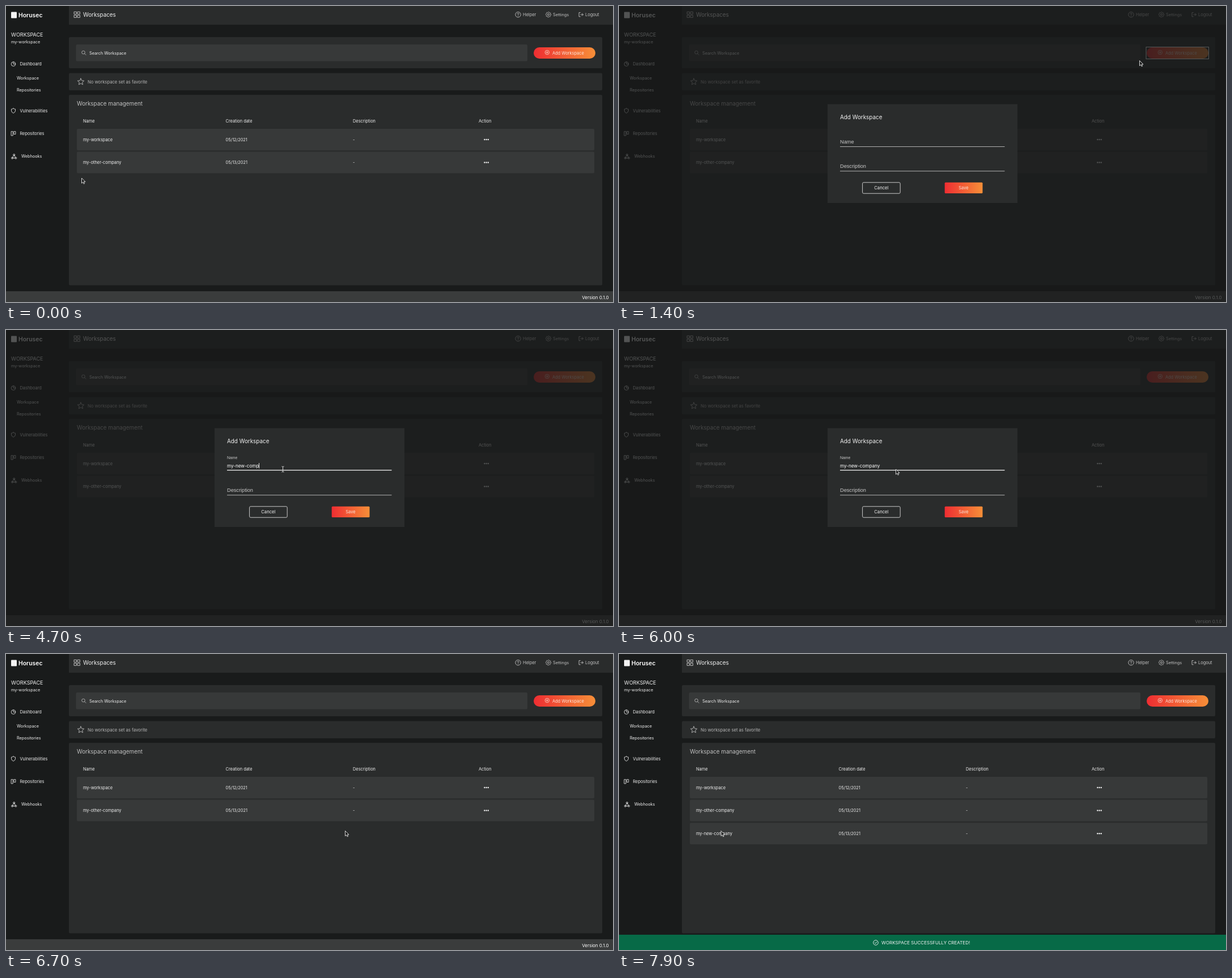
Animation, 1071 px wide and 523 px high, one loop 8 s. Source, as an HTML page:

```html
<!DOCTYPE html>
<html lang="en">
<head>
<meta charset="utf-8">
<title>Add workspace</title>
<style>
html, body { margin: 0; width: 100%; height: 100%; overflow: hidden; background: #191b1b; }
svg { display: block; width: 100vw; height: 100vh; font-family: Inter, "Open Sans", sans-serif; }
text { white-space: pre; }
.mui { font-family: "Liberation Sans", Arial, sans-serif; }
</style>
</head>
<body>
<svg id="stage" viewBox="0 0 1071 523" xmlns="http://www.w3.org/2000/svg">
  <defs>
    <linearGradient id="fire"><stop offset="0" stop-color="#ee2d32"/><stop offset="1" stop-color="#f78f38"/></linearGradient>
  </defs>
  <g id="page"></g>
  <g id="row3"></g>
  <g id="add"></g>
  <rect id="ring" fill="none" stroke="#fff"/>
  <rect id="shade" width="1071" height="523" fill="#181a1a" opacity=".73"/>
  <g id="modal"></g>
  <g id="toast"></g>
  <g id="arrow"><path d="M.5 .5V9.6L2.7 7.7L4.2 10.8L5.6 10.1L4.2 7.1H7Z" fill="#1b1c1c" stroke="#e8e8e8" stroke-width=".9" stroke-linejoin="round"/></g>
  <g id="beam"><path d="M-2 -5Q0 -5 0 -3.6Q0 -5 2 -5M0 -3.6V3.6M-2 5Q0 5 0 3.6Q0 5 2 5M-1 1.5H1" fill="none" stroke="#e8e8e8" stroke-width=".9"/></g>
</svg>
<script>
const NS = 'http://www.w3.org/2000/svg';
const $ = id => document.getElementById(id);

function el(parent, tag, attrs) {
  const node = document.createElementNS(NS, tag);
  set(node, attrs);
  return parent.appendChild(node);
}
function set(node, attrs) {
  for (const k in attrs) node.setAttribute(k, attrs[k]);
}
const box = (p, x, y, w, h, fill, rx = 0) =>
  el(p, 'rect', { x, y, width: w, height: h, fill, rx });
const line = (p, d, stroke = '#ddd', w = .9) =>
  el(p, 'path', { d, fill: 'none', stroke, 'stroke-width': w, 'stroke-linejoin': 'round', 'stroke-linecap': 'round' });
const ring = (p, cx, cy, r, stroke = '#ddd', w = .9) =>
  el(p, 'circle', { cx, cy, r, fill: 'none', stroke, 'stroke-width': w });
function text(p, str, x, y, size = 7.4, fill = '#eee', more = {}) {
  const node = el(p, 'text', { x, y, 'font-size': size, fill, ...more });
  node.textContent = str;
  return node;
}

function drawSidebar(p) {
  box(p, 9, 10.5, 10, 11, '#f2f2f2', 1);
  text(p, 'Horusec', 22, 20.2, 10.4, '#fff', { 'font-weight': 600 });
  text(p, 'WORKSPACE', 9, 53.8, 9.05);
  text(p, 'my-workspace', 9, 65.8, 7.25);
  const items = [['Dashboard', 24.5, 105, 7.45], ['Workspace', 19, 130.1, 7.3], ['Repositories', 19, 151.2, 7.3],
    ['Vulnerabilities', 24.5, 187.6, 7.35], ['Repositories', 24.5, 227.9, 7.35], ['Webhooks', 27, 268.2, 7.3]];
  items.forEach(i => text(p, ...i));
  ring(p, 13, 102.5, 3.8);
  line(p, 'M13 98.7V102.5H16.8');
  line(p, 'M13 181Q14.5 182.3 16.5 182.2V185Q16.4 188 13 189.3Q9.6 188 9.5 185V182.2Q11.5 182.3 13 181Z');
  line(p, 'M9.5 221.7H12.2V229H9.5ZM14.2 221.7H16.9V226.5H14.2Z');
  line(p, 'M14 263.4L11.2 268.5M14.4 263.4L17 268.5M11.5 268.7H16.5');
  [[14.2, 263], [11, 268.6], [17.3, 268.6]].forEach(c => ring(p, ...c, 1.5));
}

function drawHeader(p) {
  box(p, 111, 0, 960, 33, '#2a2c2c');
  for (const x of [120.4, 126.4]) for (const y of [10.3, 16.3])
    line(p, `M${x} ${y}h4v4h-4z`, '#ccc');
  text(p, 'Workspaces', 136, 18.8, 9.85, '#f2f2f2');
  const grey = '#c2c2c2';
  text(p, 'Helper', 912, 17.9, 7.45, grey);
  text(p, 'Settings', 965, 17.9, 7.3, grey);
  text(p, 'Logout', 1022, 17.9, 7.45, grey);
  ring(p, 903.5, 15.2, 4.7, grey);
  line(p, 'M902.1 14Q902.2 12.6 903.5 12.6Q905 12.7 905 14Q904.8 14.8 903.6 15.5V16.1M903.6 17.7V17.8', grey);
  ring(p, 957, 15.2, 1.6, grey);
  let gear = '';
  for (let i = 0; i < 32; i++) {
    const r = i % 4 < 2 ? 4.7 : 3.7, a = i * Math.PI / 16;
    gear += (i ? 'L' : 'M') + (957 + r * Math.cos(a)).toFixed(2) + ' ' + (15.2 + r * Math.sin(a)).toFixed(2);
  }
  line(p, gear + 'Z', grey, .8);
  line(p, 'M1013.3 11.6H1011V18.8H1013.3M1014 15.2H1018.3M1016.4 13.2L1018.4 15.2L1016.4 17.2', grey);
}

function drawRow(p, y, name, date) {
  box(p, 125, y, 913, 38, '#373939', 2);
  text(p, name, 136, y + 21.6, 7.4);
  text(p, date, 387.5, y + 21.6, 7.35);
  text(p, '-', 612, y + 21.6);
  for (const x of [844.4, 847.6, 850.8]) el(p, 'circle', { cx: x, cy: y + 19, r: 1.2, fill: '#eee' });
}

function drawPage(p) {
  box(p, 0, 0, 1071, 523, '#191b1b');
  drawSidebar(p);
  drawHeader(p);
  box(p, 111, 55, 941, 55, '#2a2c2c', 2);
  box(p, 123.5, 68, 796.5, 29.5, '#373939', 2);
  ring(p, 136.5, 82, 2.8, '#b0b0b0');
  line(p, 'M138.6 84.1L141 86.5', '#b0b0b0');
  text(p, 'Search Workspace', 147, 85.5, 7.3);
  box(p, 111, 118.5, 941, 30.5, '#2a2c2c', 2);
  let star = '';
  for (let i = 0; i < 10; i++) {
    const r = i % 2 ? 2.8 : 6, a = i * Math.PI / 5;
    star += (i ? 'L' : 'M') + (132 + r * Math.sin(a)).toFixed(2) + ' ' + (134 - r * Math.cos(a)).toFixed(2);
  }
  line(p, star + 'Z', '#bbb');
  text(p, 'No workspace set as favorite', 144, 136.7, 7.65, '#b5b5b5');
  box(p, 111, 157, 941, 336.5, '#2a2c2c', 2);
  text(p, 'Workspace management', 125, 176, 9.85, '#c2c2c2');
  [['Name', 136], ['Creation date', 387.5], ['Description', 612], ['Action', 834]]
    .forEach(([s, x]) => text(p, s, x, 206, 7.4));
  drawRow(p, 217, 'my-workspace', '05/12/2021');
  drawRow(p, 257.5, 'my-other-company', '05/13/2021');
  box(p, 0, 504, 1071, 19, '#3a3c3c');
  text(p, 'Version 0.1.0', 1063.5, 518, 7.95, '#fff', { 'text-anchor': 'end' });
}

function drawAdd(p) {
  box(p, 931, 73, 109, 20, 'url(#fire)', 10);
  ring(p, 954.8, 82, 3.7, '#f8dcd2', .8);
  line(p, 'M953.2 82H956.4M954.8 80.4V83.6', '#f8dcd2', .8);
  text(p, 'Add Workspace', 964, 85.6, 7.4, '#fbe6dc');
}

drawPage($('page'));
drawRow($('row3'), 298.3, 'my-new-company', '05/13/2021');
drawAdd($('add'));

const modal = $('modal');
box(modal, 368, 173.5, 335, 174.5, '#2a2c2c');
text(modal, 'Add Workspace', 390, 199.8, 9.88, '#f2f2f2');
const label = text(modal, 'Name', 0, 0, 9.2, '#c8c8c8', { class: 'mui' });
text(modal, 'Description', 390, 286.2, 9.2, '#c8c8c8', { class: 'mui' });
const under = box(modal, 390, 248, 290.5, 1, '#b4b4b4');
box(modal, 390, 291.3, 290.5, .9, '#c0c0c0');
const input = text(modal, '', 390, 242.7, 8.15, '#fff');
const caret = box(modal, 390, 235, 1, 9.5, '#ddd');
set(box(modal, 429.6, 311.8, 66.6, 19.4, 'none', 2), { stroke: '#ddd', 'stroke-width': .9 });
text(modal, 'Cancel', 462.8, 324.2, 7.65, '#f2f2f2', { 'text-anchor': 'middle' });
box(modal, 574.7, 311.8, 66.8, 19.2, 'url(#fire)', 1.5);
text(modal, 'Save', 608, 324.2, 7.5, '#fbe6dc', { 'text-anchor': 'middle' });

const toast = $('toast');
box(toast, 0, 496, 1071, 27, '#076a47');
ring(toast, 453, 510, 4.3, '#f2f2f2');
line(toast, 'M451.2 510.1L452.6 511.5L455 508.7', '#f2f2f2');
text(toast, 'WORKSPACE SUCCESSFULLY CREATED!', 463, 513, 8.03, '#f2f2f2');

// Pointer stops: time, x, y
const PATH = [
  [0, 133, 304], [100, 215, 400], [200, 450, 436], [300, 740, 400], [400, 922, 351], [500, 922, 351],
  [600, 945, 290], [700, 985, 190], [800, 994, 130], [900, 972, 109], [1000, 972, 109], [1100, 965, 83.5],
  [1300, 965, 83.5], [1400, 918, 96.5], [1500, 720, 180], [1600, 560, 260], [1700, 500, 275], [1900, 500, 275],
  [2000, 488, 246], [6000, 488, 246], [6100, 505, 262], [6300, 598, 312.5], [6800, 598, 312.5],
  [6900, 590, 300], [7100, 480, 287], [7300, 330, 310], [7500, 245, 344], [7700, 217, 351], [7900, 179.5, 312.5]
];
// Characters typed by each time
const NAME = 'my-new-company';
const TYPED = [[2700, 1], [2900, 2], [3300, 3], [3600, 4], [3700, 5], [3800, 7], [4400, 8], [4500, 10],
  [4700, 11], [4800, 12], [5000, 13], [5600, 14]];

function pointAt(t) {
  const i = PATH.findIndex(k => k[0] >= t);
  if (i < 1) return PATH[0].slice(1);
  const [t0, x0, y0] = PATH[i - 1], [t1, x1, y1] = PATH[i], f = (t - t0) / (t1 - t0);
  return [x0 + (x1 - x0) * f, y0 + (y1 - y0) * f];
}
const show = (node, on) => set(node, { visibility: on ? 'visible' : 'hidden' });

function render(now) {
  const t = Math.floor(now % 8000 / 100) * 100;
  const open = t >= 1400 && t < 6600, focus = t >= 2000, hover = t >= 1100 && t < 1400;

  set($('add'), {
    transform: hover ? 'translate(985.5 83) scale(1.022) translate(-985.5 -83)' : '',
    opacity: open ? .85 : 1
  });
  show($('ring'), t >= 1300 && t < 2000);
  set($('ring'), hover
    ? { x: 928.5, y: 72, width: 113.5, height: 22, 'stroke-width': 1.3, rx: 1 }
    : { x: 930, y: 72.5, width: 110.5, height: 21, 'stroke-width': 1, rx: 0 });

  show($('shade'), open);
  set(modal, { display: open ? 'inline' : 'none' });
  const lift = t < 2000 ? 0 : t < 2100 ? .5 : 1;
  set(label, { transform: `translate(390 ${242.7 - 14.5 * lift}) scale(${1 - .25 * lift})` });
  set(under, focus ? { y: 247.1, height: 1.2, fill: '#fff' } : { y: 248, height: .9, fill: '#c0c0c0' });

  let typed = 0, last = 2000;
  for (const [at, n] of TYPED) if (t >= at) { typed = n; last = at; }
  input.textContent = NAME.slice(0, typed);
  show(caret, open && focus && t < 6000 && (t - last) % 1000 < 500);
  if (open) set(caret, { x: Math.floor(390 + (typed ? input.getComputedTextLength() : 0)) });

  show($('row3'), t >= 7000);
  show(toast, t >= 6900);
  set(toast, { transform: `translate(0 ${27 * Math.max(0, 1 - (t - 6800) / 200)})` });

  const [x, y] = pointAt(t), beam = t >= 2000 && t < 6000;
  show($('arrow'), !beam);
  show($('beam'), beam);
  set($('arrow'), { transform: `translate(${x} ${y - .5})` });
  set($('beam'), { transform: `translate(${x + .5} ${y})` });
}

const start = performance.now();
function tick() {
  render(performance.now() - start);
  requestAnimationFrame(tick);
}
render(0);
requestAnimationFrame(tick);
</script>
</body>
</html>
```
